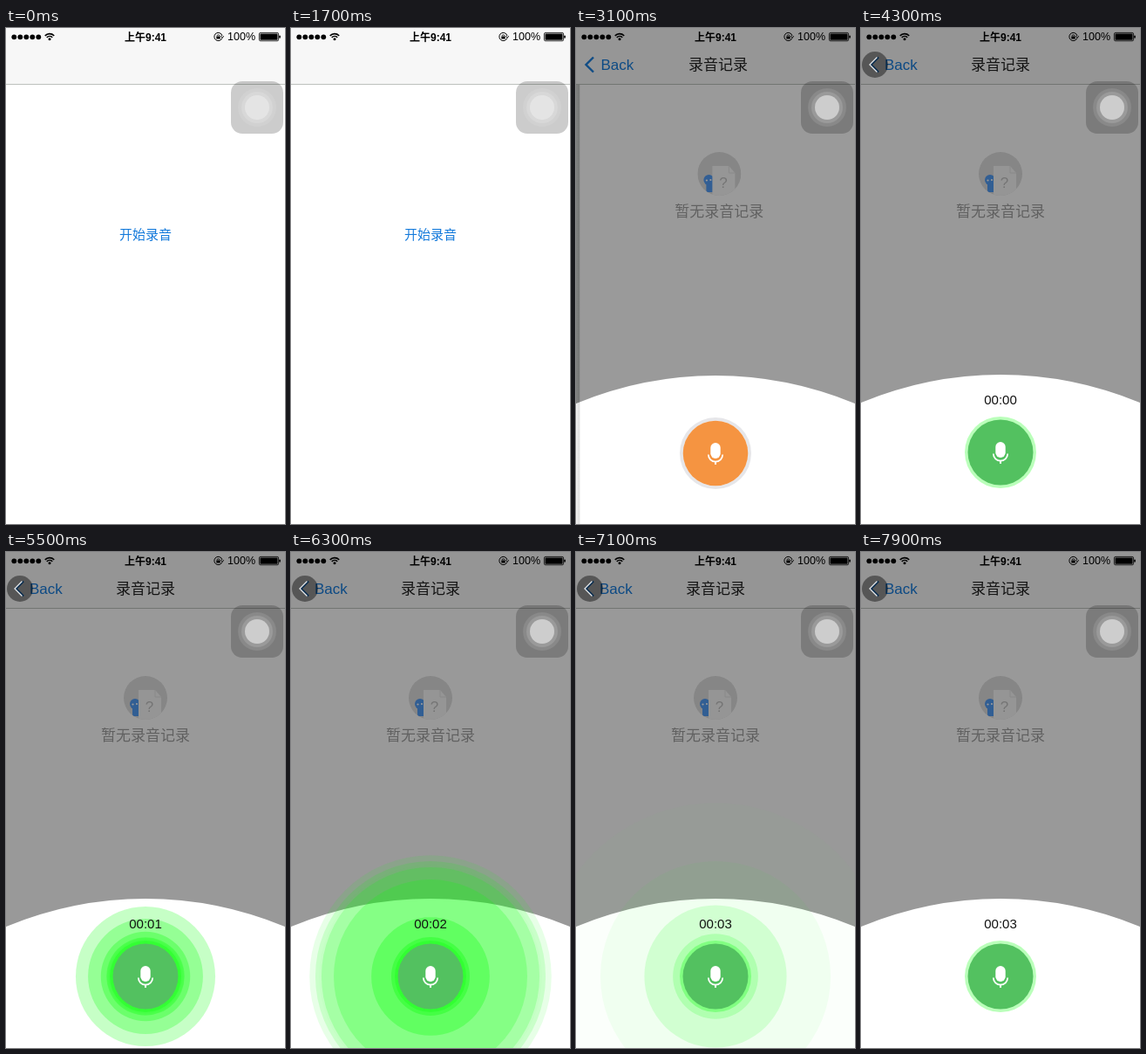
An HTML page with a canvas for the animation above (8 s loop, 320 px wide and 568 px high).

```html
<!DOCTYPE html>
<html lang="zh">
<head>
<meta charset="utf-8">
<title>录音</title>
<style>
html, body { margin: 0; width: 100%; height: 100%; overflow: hidden; background: #fff; }
canvas { display: block; width: 320px; height: 568px; }
</style>
</head>
<body>
<canvas id="stage" width="320" height="568"></canvas>
<script>
const c = document.getElementById('stage').getContext('2d');
const LOOP = 8000, STEP = 100, PUSH = 2700, RECORD = 4100, TAU = Math.PI * 2;
const FONT = '"Liberation Sans", "Noto Sans CJK SC", "Noto Sans CJK", sans-serif';
const BLUE = '#147adb';

// Sound waves: [start ms, final radius]
const waves = [
  [4700, 43], [4900, 45], [5100, 47], [5200, 118], [5280, 116], [5380, 128],
  [5600, 145], [5700, 144], [5800, 146], [5900, 144], [6155, 199], [6230, 133],
  [6500, 87], [6600, 51]
];
const WAVE_MS = 1000, REST = 40;

// cubic-bezier(.25, .1, .25, 1)
function ease(x) {
  let lo = 0, hi = 1;
  for (let i = 0; i < 20; i++) {
    const m = (lo + hi) / 2;
    if (.75 * m * (1 - m) + m ** 3 < x) lo = m; else hi = m;
  }
  return .3 * lo * (1 - lo) ** 2 + 3 * lo * lo * (1 - lo) + lo ** 3;
}

function rect(x, y, w, h, fill) {
  c.fillStyle = fill;
  c.fillRect(x, y, w, h);
}

function round(x, y, w, h, r, fill) {
  c.fillStyle = fill;
  c.beginPath();
  c.roundRect(x, y, w, h, r);
  c.fill();
}

function disc(x, y, r, fill) {
  c.fillStyle = fill;
  c.beginPath();
  c.arc(x, y, r, 0, TAU);
  c.fill();
}

function arc(x, y, r, from, to, width, color) {
  c.strokeStyle = color;
  c.lineWidth = width;
  c.beginPath();
  c.arc(x, y, r, from, to);
  c.stroke();
}

function line(points, width, color) {
  c.strokeStyle = color;
  c.lineWidth = width;
  c.beginPath();
  points.forEach(([x, y]) => c.lineTo(x, y));
  c.stroke();
}

function text(str, x, y, size, fill, align = 'center', weight = 400) {
  c.font = `${weight} ${size}px ${FONT}`;
  c.textAlign = align;
  c.textBaseline = 'alphabetic';
  c.fillStyle = fill;
  c.fillText(str, x, y);
}

function faded(alpha, draw) {
  c.save();
  c.globalAlpha = alpha;
  draw();
  c.restore();
}

function shifted(x, y, draw) {
  c.save();
  c.translate(x, y);
  draw();
  c.restore();
}

function clipped(x, y, r, draw) {
  c.save();
  c.beginPath();
  c.arc(x, y, r, 0, TAU);
  c.clip();
  draw();
  c.restore();
}

function emptyPage() {
  rect(0, 0, 320, 568, '#fff');
  clipped(160, 167, 25, () => {
    rect(135, 142, 50, 50, '#dedede');
    round(142, 168, 12, 12, 6, '#529cf4');
    round(145, 174, 9, 14, 2, '#529cf4');
    disc(145.5, 174.5, 1.1, '#fff');
    disc(150, 174, 1.1, '#fff');
    c.fillStyle = '#f8f8f8';
    c.beginPath();
    [[152, 158], [171, 158], [178, 166], [178, 192], [152, 192]].forEach(p => c.lineTo(...p));
    c.fill();
    line([[171, 158], [171, 166], [178, 166]], 1, '#e2e2e2');
  });
  text('?', 164.5, 183, 17, '#c0c0c0');
  text('暂无录音记录', 160, 216, 17, '#a0a0a0');
}

function navBar(p) {
  rect(0, 0, 320, 64, '#f7f7f7');
  rect(0, 64, 320, 1, '#bdc1bd');
  if (!p) return;
  faded(p, () => {
    text('Back', 27 + 108 * (1 - p), 48, 17, BLUE, 'left');
    text('录音记录', 160 + 220 * (1 - p), 48, 17, '#222', 'center', 500);
  });
  faded(Math.max(0, 2 * p - 1), () => line([[20, 33.5], [11.5, 42], [20, 50.5]], 2.4, BLUE));
}

function statusBar() {
  for (let i = 0; i < 5; i++) disc(9.3 + 7 * i, 10.3, 2.9, '#000');
  const up = -Math.PI / 2;
  arc(50, 14, 7.3, up - .8, up + .8, 1.7, '#000');
  arc(50, 14, 4.5, up - .8, up + .8, 1.6, '#000');
  disc(50, 12.8, 1.5, '#000');
  text('上午9:41', 160, 14.5, 12, '#000', 'center', 700);
  arc(243.5, 10, 4.6, .3, TAU - .2, 1, '#000');
  line([[246.3, 9.3], [248.2, 11], [250, 9.3]], 1, '#000');
  rect(241.3, 9.5, 4.4, 3, '#000');
  arc(243.5, 9.3, 1.5, Math.PI, TAU, .9, '#000');
  text('100%', 286, 14.3, 12.5, '#000', 'right');
  c.strokeStyle = '#000';
  c.lineWidth = .8;
  c.beginPath();
  c.roundRect(290.4, 5.4, 22.2, 9.4, 1.5);
  c.stroke();
  rect(291.5, 6.5, 20, 7.2, '#000');
  round(313.2, 8.4, 1.6, 3.4, .8, '#000');
}

function floatingButton(glow) {
  round(258, 61, 60, 60, 13, 'rgba(0,0,0,.2)');
  disc(288, 91, 22, 'rgba(255,255,255,.1)');
  disc(288, 91, 18, 'rgba(255,255,255,.14)');
  disc(288, 91, 14, `rgba(255,255,255,${glow})`);
}

function drawWaves(t) {
  for (const [start, end] of waves) {
    const p = (t - start) / WAVE_MS;
    if (p < 0 || p >= 1) continue;
    disc(160, 486, REST + (end - REST) * ease(p), `rgba(0,255,0,${.32 * (1 - p)})`);
  }
}

function mic() {
  round(154.3, 474, 11.4, 18, 5.7, '#fff');
  arc(160, 487.5, 8.2, 0, Math.PI, 1.7, '#fff');
  line([[160, 495.5], [160, 499]], 2, '#fff');
}

function recordSheet(t, drop, rec, edge) {
  disc(160, 813, 416, '#fff');
  drawWaves(t);
  faded(1 - rec, () => {
    disc(160, 486, 41, '#e6e6e9');
    disc(160, 486, 37.3, '#fff');
    faded((1 - rec) * (1 - .38 * drop), () =>
      disc(160, 486, 37.3, t >= 3800 ? '#e0842f' : '#f5933f'));
  });
  faded(rec, () => {
    disc(160, 486, 41, 'rgba(0,255,0,.27)');
    disc(160, 486, 37.5, '#53c160');
    const sec = Math.max(0, Math.floor((t - RECORD) / 1000));
    text('00:0' + sec, 160, 431, 15, '#111');
  });
  mic();
  clipped(160, 813, 416, () => rect(0, 397, edge, 171, 'rgba(0,0,0,.035)'));
}

function closeButton(rec) {
  faded(rec, () => {
    disc(16, 42, 15, 'rgba(0,0,0,.42)');
    line([[18.5, 33.5], [10, 42], [18.5, 50.5]], 1.3, '#e4e6e8');
  });
}

function draw(t) {
  const pushed = t >= PUSH;
  const drop = pushed && t < PUSH + 600 ? Math.exp(-.9 * (t - PUSH) / 100) : 0;
  const p = pushed ? 1 - drop / 2 : 0;
  const edge = 320 * (1 - p);
  const rec = Math.min(1, Math.max(0, (t - RECORD + 100) / 300));

  rect(0, 0, 320, 568, '#fff');
  shifted(-96 * p, 0, () =>
    faded(pushed ? .35 : 1, () => text('开始录音', 160, 241.5, 15, BLUE)));
  if (pushed) {
    rect(0, 65, edge, 503, `rgba(0,10,0,${.16 * p})`);
    shifted(edge, 0, emptyPage);
  }
  navBar(p);

  if (pushed) {
    rect(0, 0, 320, 568, `rgba(0,0,0,${.4 * p})`);
    shifted(0, 37.5 * drop, () => recordSheet(t, drop, rec, edge));
    if (edge > 0) {
      const shade = c.createLinearGradient(edge - 5, 0, edge, 0);
      shade.addColorStop(0, 'rgba(0,0,0,0)');
      shade.addColorStop(1, 'rgba(0,0,0,.1)');
      rect(edge - 5, 65, 5, 503, shade);
    }
    closeButton(rec);
  }
  floatingButton(pushed ? .5 : .32);
  statusBar();
}

const begin = performance.now();
function tick() {
  const t = (performance.now() - begin) % LOOP;
  draw(Math.floor(t / STEP) * STEP);
  requestAnimationFrame(tick);
}
tick();
</script>
</body>
</html>
```
